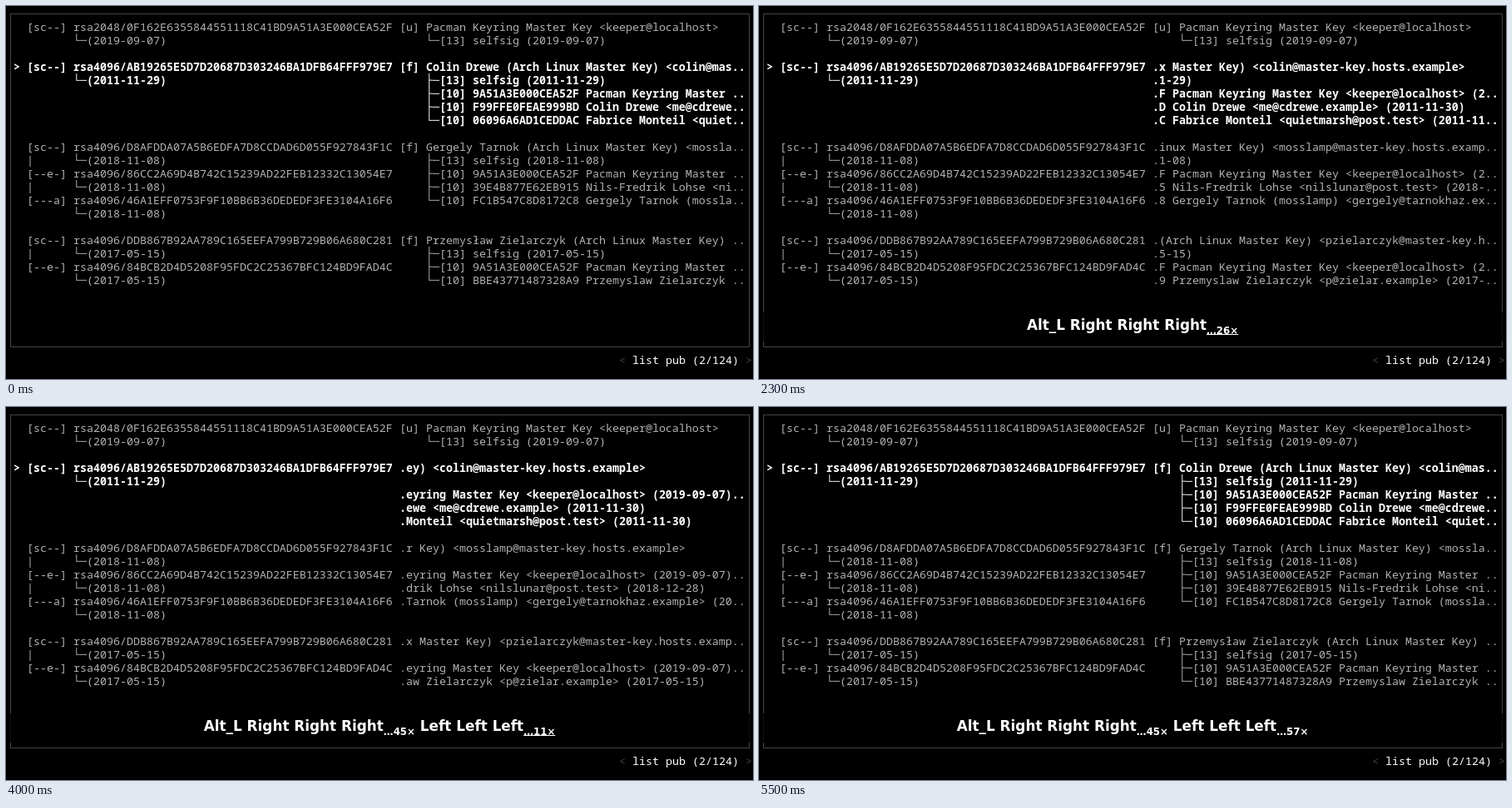
Recreate the animation shown at these times as an HTML page. Size 898 by 448 pixels, loop 6100 ms.

```html
<!DOCTYPE html>
<html lang="en">
<head>
<meta charset="utf-8">
<title>Key list</title>
<style>
  html, body { margin: 0; width: 100%; height: 100%; overflow: hidden; background: #000; }
  #stage { position: relative; width: 898px; height: 448px; overflow: hidden; background: #000; }
  #stage div { position: absolute; white-space: pre; }
  #frame { left: 5px; top: 9px; width: 887px; height: 399px; border: 1px solid #444; }
  .row { left: 9px; height: 16px; font: 13.3333px/16px "Noto Sans Mono", monospace; color: #b2b2b2; }
  .row.sel { font-weight: 700; color: #fff; }
  .row .uid { left: 464px; top: 0; }
  #status { left: 737px; top: 417px; color: #fff; }
  #status i { font-style: normal; color: #444; }
  #keys { left: 0; top: 368px; width: 898px; height: 35px; background: rgba(0, 0, 0, .8); }
  #label { left: 0; width: 898px; text-align: center; color: #fff;
    font: 700 16.85px/20px "DejaVu Sans", sans-serif; }
  #label .n { position: relative; top: 5px; font-size: 11.8px; line-height: 0; }
  #label .u { text-decoration: underline 1.5px; text-underline-offset: .5px; text-decoration-skip-ink: none; }
  #label .n.u { text-decoration-thickness: 1px; text-underline-offset: 0; }
</style>
</head>
<body>
<div id="stage">
  <div id="frame"></div>
  <div id="status" class="row"><i>&lt;</i> list pub (2/124) <i>&gt;</i></div>
  <div id="keys"></div>
  <div id="label"></div>
</div>
<script>
const LOOP = 6100, STEP = 50, WIDTH = 52, RATE = 0.036, END = 45;
const $ = id => document.getElementById(id);
const stage = $('stage'), keys = $('keys'), label = $('label');

const keyring = '9A51A3E000CEA52F Pacman Keyring Master Key <keeper@localhost> (2019-09-07) [!x]';
const master = (name, user) => `[f] ${name} (Arch Linux Master Key) <${user}@master-key.hosts.example>`;

// row: first line; left: key column; right: user ids, then signatures
const entries = [
  { row: 0, fixed: true,
    left: ['[sc--] rsa2048/0F162E6355844551118C41BD9A51A3E000CEA52F', '       └─(2019-09-07)'],
    uid: '[u] Pacman Keyring Master Key <keeper@localhost>',
    sigs: ['[13] selfsig (2019-09-07)'] },
  { row: 3, sel: true,
    left: ['[sc--] rsa4096/AB19265E5D7D20687D303246BA1DFB64FFF979E7', '       └─(2011-11-29)'],
    uid: master('Colin Drewe', 'colin'),
    sigs: ['[13] selfsig (2011-11-29)', '[10] ' + keyring,
      '[10] F99FFE0FEAE999BD Colin Drewe <me@cdrewe.example> (2011-11-30)',
      '[10] 06096A6AD1CEDDAC Fabrice Monteil <quietmarsh@post.test> (2011-11-30)'] },
  { row: 9,
    left: ['[sc--] rsa4096/D8AFDDA07A5B6EDFA7D8CCDAD6D055F927843F1C', '|      └─(2018-11-08)',
      '[--e-] rsa4096/86CC2A69D4B742C15239AD22FEB12332C13054E7', '|      └─(2018-11-08)',
      '[---a] rsa4096/46A1EFF0753F9F10BB6B36DEDEDF3FE3104A16F6', '       └─(2018-11-08)'],
    uid: master('Gergely Tarnok', 'mosslamp'),
    sigs: ['[13] selfsig (2018-11-08)', '[10] ' + keyring,
      '[10] 39E4B877E62EB915 Nils-Fredrik Lohse <nilslunar@post.test> (2018-12-28)',
      '[10] FC1B547C8D8172C8 Gergely Tarnok (mosslamp) <gergely@tarnokhaz.example> (2018-11-12)'] },
  { row: 16,
    left: ['[sc--] rsa4096/DDB867B92AA789C165EEFA799B729B06A680C281', '|      └─(2017-05-15)',
      '[--e-] rsa4096/84BCB2D4D5208F95FDC2C25367BFC124BD9FAD4C', '       └─(2017-05-15)'],
    uid: master('Przemysław Zielarczyk', 'pzielarczyk'),
    sigs: ['[13] selfsig (2017-05-15)', '[10] ' + keyring,
      '[10] BBE43771487328A9 Przemyslaw Zielarczyk <p@zielar.example> (2017-05-15)'] }
];

const lines = [];
for (const e of entries) {
  const right = [e.uid, ...e.sigs.map((s, i) => '    ' + (i < e.sigs.length - 1 ? '├─' : '└─') + s)];
  const count = Math.max(e.left.length, right.length);
  for (let i = 0; i < count; i++) {
    const row = document.createElement('div'), uid = document.createElement('div');
    row.className = e.sel ? 'row sel' : 'row';
    row.style.top = 17 + 16 * (e.row + i) + 'px';
    row.textContent = (e.sel && !i ? '> ' : '  ') + (e.left[i] || '');
    uid.className = 'uid';
    row.append(uid);
    stage.insertBefore(row, keys);
    lines.push({ uid, text: right[i] || '', fixed: e.fixed });
  }
}

function clip(text, offset) {
  if (offset) text = text.length > offset + 1 ? '.' + text.slice(offset + 1) : '';
  return text.length > WIDTH ? text.slice(0, WIDTH - 2) + '..' : text;
}

// key repeat: one press, then a steady run up to max
const presses = (t, at, base, max) =>
  Math.min(max, Math.max(1, Math.floor(base + (t - at) * RATE)));

function scrollAt(t) {
  if (t < 1300) return 0;
  if (t < 3400) return presses(t, 1900, 10.9, END);
  return END - presses(t, 4000, 10.3, END);
}

function keyText(name, n, recent) {
  const u = recent ? 'u' : '';
  if (n > 3) return ` ${name}`.repeat(3) + `<span class="n ${u}">…${n}×</span>`;
  return ` ${name}`.repeat(n - 1) + ` <span class="${u}">${name}</span>`;
}

function labelAt(t) {
  if (t < 1150) return '';
  if (t < 1250) return '<span class="u">Alt_L</span>';
  const recent = t < 1450 || (t >= 1650 && t < 3050);
  let html = 'Alt_L' + keyText('Right', presses(t, 1900, 12.4, 45), recent);
  if (t >= 3350) {
    const lately = t < 3550 || (t >= 3750 && t < 5500);
    html += keyText('Left', presses(t, 4000, 11.3, 57), lately);
  }
  return html;
}

let last = -1;
function draw() {
  const t = Math.floor(performance.now() % LOOP / STEP) * STEP;
  if (t !== last) {
    last = t;
    const offset = scrollAt(t), html = labelAt(t);
    for (const l of lines) l.uid.textContent = clip(l.text, l.fixed ? 0 : offset);
    keys.style.visibility = html ? 'visible' : 'hidden';
    label.innerHTML = html;
    label.style.top = (html.includes('×') ? 373 : 375) + 'px';
  }
  requestAnimationFrame(draw);
}
draw();
</script>
</body>
</html>
```
